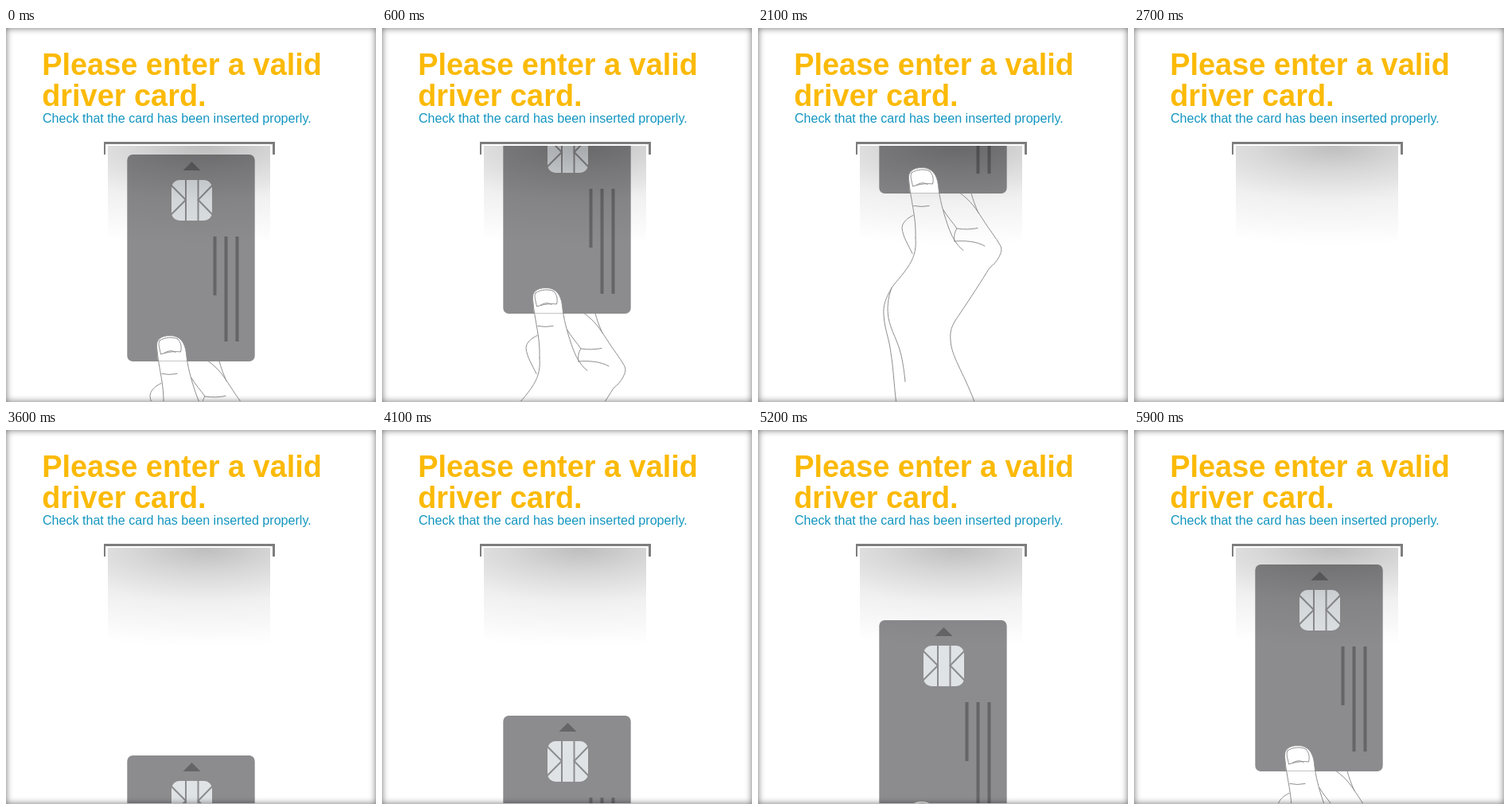
These frames come from a looping animation (465 px wide and 470 px high, 6 s). An HTML page with a canvas:

```html
<!DOCTYPE html>
<html lang="en">
<head>
<meta charset="utf-8">
<title>Insert card</title>
<style>
html, body { margin: 0; width: 100%; height: 100%; overflow: hidden; background: #fff; }
#stage { position: relative; width: 465px; height: 470px; overflow: hidden; }
canvas, svg { position: absolute; left: 0; top: 0; }
#edge { position: absolute; inset: 0; box-shadow: inset 0 0 8px rgba(0, 0, 0, .58); }
text { font-family: "Liberation Sans", Arial, sans-serif; }
</style>
</head>
<body>
<div id="stage">
  <canvas id="view" width="465" height="470"></canvas>
  <svg width="465" height="130">
    <g fill="#fbba07" font-size="37.9" font-weight="bold">
      <text x="45.2" y="58.5">Please enter a valid</text>
      <text x="45.2" y="97.5">driver card.</text>
    </g>
    <text x="45.9" y="119" fill="#1496c0" font-size="16.1">Check that the card has been inserted properly.</text>
  </svg>
  <div id="edge"></div>
</div>
<script>
const ctx = document.getElementById('view').getContext('2d');
const LOOP = 6000, STEP = 100;
const CARD = '#8c8c8e', MARK = '#656567', LINE = '#8e8e8e';

// Hand outlines, drawn with the card's lower edge at y = 289.
const outlines = [
  // thumb
  'M198 345 C199 318 192 300 189.5 272 C188 262 195 257 206 257 C218 257 225 265 226.5 279 C228 296 233 313 238 328 C243 343 249 354 258 361',
  // wrist, left and right
  'M198 345 C199 357 197 366 193 374 C186 388 174 399 168 408 C160 422 157 431 158 442 C159 460 165 472 167 490 C170 508 171 530 173.5 551',
  'M254 289 C268 299 274 309 282 321 C290 334 299 345 304 354 C307 359 306 363 303 369 C300 375 296 379 291 383 C281 399 267 421 252 443 C243 456 241 462 242 474 C243 494 257 512 272 551',
  // back fingers
  'M195 317 C188 320 181 326 181 333 C182 344 189 354 194 365',
  'M268 289 C270 297 273 305 277 314',
  'M233 310 C238 319 245 326 250 333.5 C247 338 246 343 247 349.5',
  'M250 333.5 C259 335 268 334.5 276 333',
  'M247 349.5 C260 348.5 275 349.5 285 355.5',
  // creases
  'M168 408 C163 421 162 434 164 446 C167 462 176 475 180 493 C183 507 184 516 185 526',
  'M196 305 Q205 307 215 305',
  // nail
  'M193 263.5 C200 258.5 210 258.5 216 261.5 C220 266 221 271 219.5 277.5 C211 276.5 204 277.5 194.5 280.5 C193.5 274 190.5 268 193 263.5Z',
  'M199 279 C204 275.5 209 275.5 213 278'
].map(d => new Path2D(d));
const tip = new Path2D('M191 289 L189.5 272 C188 262 195 257 206 257 C218 257 225 265 226.5 279 L227.5 289Z');

function rect(x, y, w, h, color) {
  ctx.fillStyle = color;
  ctx.fillRect(x, y, w, h);
}

function rounded(x, y, w, h, r, color) {
  ctx.fillStyle = color;
  ctx.beginPath();
  ctx.roundRect(x, y, w, h, r);
  ctx.fill();
}

function poly(...p) {
  ctx.beginPath();
  for (let i = 0; i < p.length; i += 2) ctx.lineTo(p[i], p[i + 1]);
}

// Runs a drawing shifted down by dy, showing only rows from top to 469.
function layer(top, dy, draw) {
  ctx.save();
  ctx.beginPath();
  ctx.rect(0, top, 465, 469 - top);
  ctx.clip();
  ctx.translate(0, dy);
  draw();
  ctx.restore();
}

function drawCard() {
  rounded(152.3, 159, 160.4, 260, 7, CARD);
  ctx.fillStyle = MARK;
  poly(222.5, 179, 233.5, 168, 244.5, 179);
  ctx.fill();
  for (const [x, h] of [[260.5, 74], [274.5, 132], [288.5, 132]]) rect(x, 262, 4, h, MARK);

  rounded(208, 191, 51, 51, 10, '#dfe3e6');
  ctx.strokeStyle = CARD;
  ctx.lineWidth = 2;
  for (const x of [226, 241.5]) {
    poly(x, 191, x, 242);
    ctx.stroke();
  }
  poly(207, 197, 226, 216, 207, 235);
  ctx.stroke();
  poly(260, 197, 241.5, 216, 260, 235);
  ctx.stroke();
}

// Shadow under the slot: a wide ellipse cut to the opening.
function drawShade() {
  const g = ctx.createRadialGradient(0, 0, 0, 0, 0, 125);
  g.addColorStop(0, 'rgba(0,0,0,.26)');
  g.addColorStop(.25, 'rgba(0,0,0,.155)');
  g.addColorStop(.55, 'rgba(0,0,0,.06)');
  g.addColorStop(1, 'rgba(0,0,0,0)');
  ctx.save();
  ctx.translate(250, 148);
  ctx.scale(3, 1);
  rect(-122 / 3, 0, 204 / 3, 125, g);
  ctx.restore();
}

function drawSlot() {
  const grey = '#7d7d7d';
  rect(123, 143, 215, 3, grey);
  rect(123, 143, 2, 16, grey);
  rect(335, 143, 3, 16, grey);
}

// Only the thumb tip on the card is opaque; the rest is line work.
function drawHand() {
  ctx.fillStyle = '#fff';
  ctx.fill(tip);
  ctx.strokeStyle = LINE;
  ctx.lineWidth = 1;
  ctx.lineCap = ctx.lineJoin = 'round';
  for (const p of outlines) ctx.stroke(p);
}

// Vertical shift of card and hand, or null while the slot is empty.
function shift(step) {
  if (step < 27) return -Math.floor(10.05 * step);
  if (step < 32) return null;
  return 290 - 10 * (step - 32) - (step < 49 ? 0 : 10);
}

function render(time) {
  const dy = shift(Math.floor((time % LOOP) / STEP));
  rect(0, 0, 465, 470, '#fff');
  if (dy !== null) layer(148, dy, drawCard);
  drawShade();
  drawSlot();
  if (dy !== null) layer(143, dy + 129.5, drawHand);
}

const start = performance.now();
function tick() {
  render(performance.now() - start);
  requestAnimationFrame(tick);
}
tick();
</script>
</body>
</html>
```
